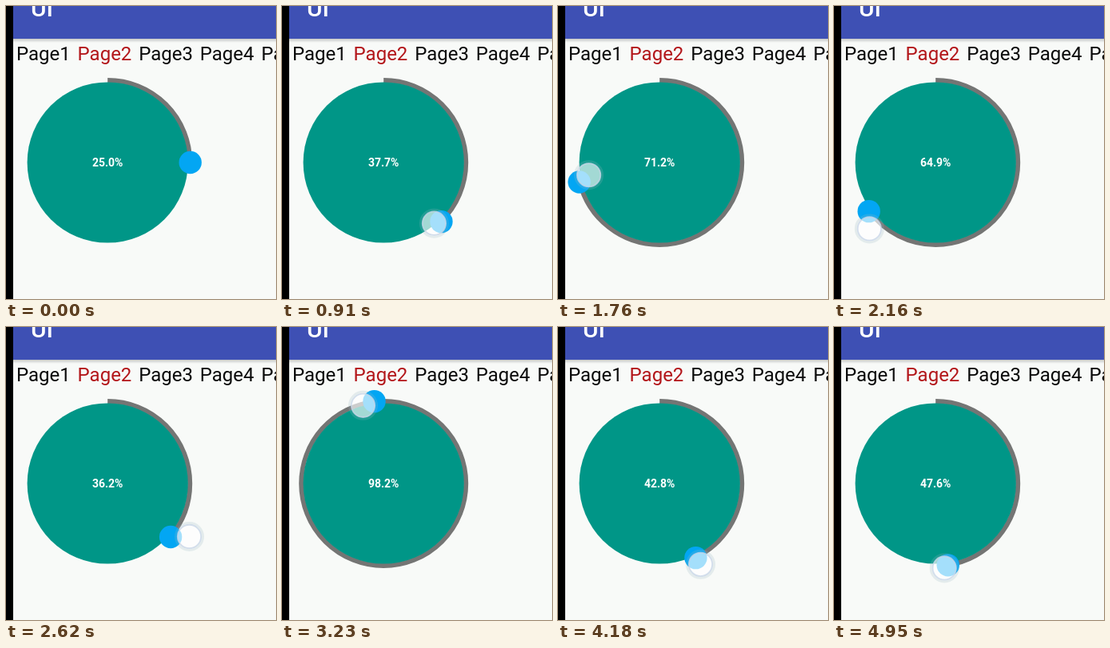
An HTML page that plays this animation: 338 px wide and 367 px high, repeating every 5.03 s.

```html
<!DOCTYPE html>
<html lang="en">
<head>
<meta charset="utf-8">
<title>Circular seek bar</title>
<style>
  html, body { margin: 0; width: 100%; height: 100%; overflow: hidden; background: #f8faf8; }
  svg { display: block; width: 100%; height: 100%; }
  text { font-family: Roboto, "Open Sans", sans-serif; }
</style>
</head>
<body>
<svg viewBox="0 0 338 367">
  <defs>
    <linearGradient id="shade" x2="0" y2="1">
      <stop stop-color="#000" stop-opacity=".2"/>
      <stop offset="1" stop-color="#000" stop-opacity="0"/>
    </linearGradient>
  </defs>
  <rect width="338" height="367" fill="#f8faf8"/>
  <rect x="9" y="41" width="329" height="5" fill="url(#shade)"/>
  <rect x="9" width="329" height="41" fill="#3e50b4"/>
  <text x="31" y="13" font-size="30" font-weight="500" fill="#fff">UI</text>
  <g id="tabs" font-size="24"></g>
  <rect width="9" height="367" fill="#000"/>

  <g transform="translate(127.2 196)">
    <circle id="arc" r="103" fill="none" stroke="#747574" stroke-width="6" pathLength="100" transform="rotate(-90)"/>
    <circle r="100.6" fill="#009687"/>
    <text id="label" y="5" font-size="14" font-weight="700" fill="#fff" text-anchor="middle"></text>
    <circle id="knob" r="14.2" fill="#03a6f3"/>
    <g id="touch">
      <circle r="17" fill="none" stroke="#96b4be" stroke-opacity=".22" stroke-width="3"/>
      <circle r="14.7" fill="#fff" fill-opacity=".64" stroke="#c8d6e8" stroke-opacity=".8" stroke-width="1.8"/>
    </g>
  </g>
</svg>
<script>
const LOOP = 5030, DRAG_START = 510, STEP = 77.7, LAST_STEP = 57;
const FINGER_LEAD = 0.45;  // steps by which the finger runs ahead of the knob
const $ = id => document.getElementById(id);
const [tabs, arc, label, knob, touch] = ["tabs", "arc", "label", "knob", "touch"].map($);

for (let i = 0; i < 5; i++) {
  const tab = document.createElementNS("http://www.w3.org/2000/svg", "text");
  tab.setAttribute("x", 13 + 76.6 * i);
  tab.setAttribute("y", 68);
  tab.setAttribute("fill", i === 1 ? "#b3161a" : "#0a0a0a");
  tab.textContent = "Page" + (i + 1);
  tabs.append(tab);
}

// Key points of the drag; percent runs below zero past the top
const drag = [
  { step: 0, percent: 25, radius: 98 },
  { step: 5, percent: 37.7, radius: 99 },
  { step: 16, percent: 71.2, radius: 90 },
  { step: 18, percent: 74.5, radius: 97 },
  { step: 24, percent: 49, radius: 131 },
  { step: 27, percent: 36.2, radius: 122 },
  { step: 35, percent: -1.8, radius: 101 },
  { step: 43, percent: -44, radius: 127 },
  { step: 47, percent: -57.2, radius: 113.6 },
  { step: 51, percent: -58.5, radius: 104 },
  { step: 57, percent: -52.4, radius: 106.5 },
  { step: 60, percent: -47, radius: 107 }
];

const rate = (a, b, key) => (b[key] - a[key]) / (b.step - a.step);

// Harmonic mean of the neighbouring rates: smooth, without overshoot
function slope(i, key) {
  if (i === 0 || i === drag.length - 1) return 0;
  const before = rate(drag[i - 1], drag[i], key), after = rate(drag[i], drag[i + 1], key);
  return before * after > 0 ? 2 * before * after / (before + after) : 0;
}

function sample(step, key) {
  const i = drag.findLastIndex(p => p.step <= step);
  const a = drag[i], b = drag[i + 1], span = b.step - a.step;
  const u = (step - a.step) / span, v = 1 - u;
  return v * v * (1 + 2 * u) * a[key] + u * u * (3 - 2 * u) * b[key]
    + u * v * span * (v * slope(i, key) - u * slope(i + 1, key));
}

function place(el, percent, radius) {
  const angle = percent * Math.PI / 50;
  el.setAttribute("transform", `translate(${radius * Math.sin(angle)} ${-radius * Math.cos(angle)})`);
}

function render(time) {
  const tick = Math.floor((time - DRAG_START) / STEP);
  const step = Math.min(Math.max(tick, 0), LAST_STEP);
  const percent = (sample(step, "percent") + 100) % 100;
  arc.setAttribute("stroke-dasharray", `${percent} 200`);
  label.textContent = percent.toFixed(1) + "%";
  place(knob, percent, 103.5);
  place(touch, sample(step + FINGER_LEAD, "percent"), sample(step, "radius"));
  touch.setAttribute("visibility", tick < 0 ? "hidden" : "visible");
}

const start = performance.now();
function loop() {
  render((performance.now() - start) % LOOP);
  requestAnimationFrame(loop);
}
loop();
</script>
</body>
</html>
```
